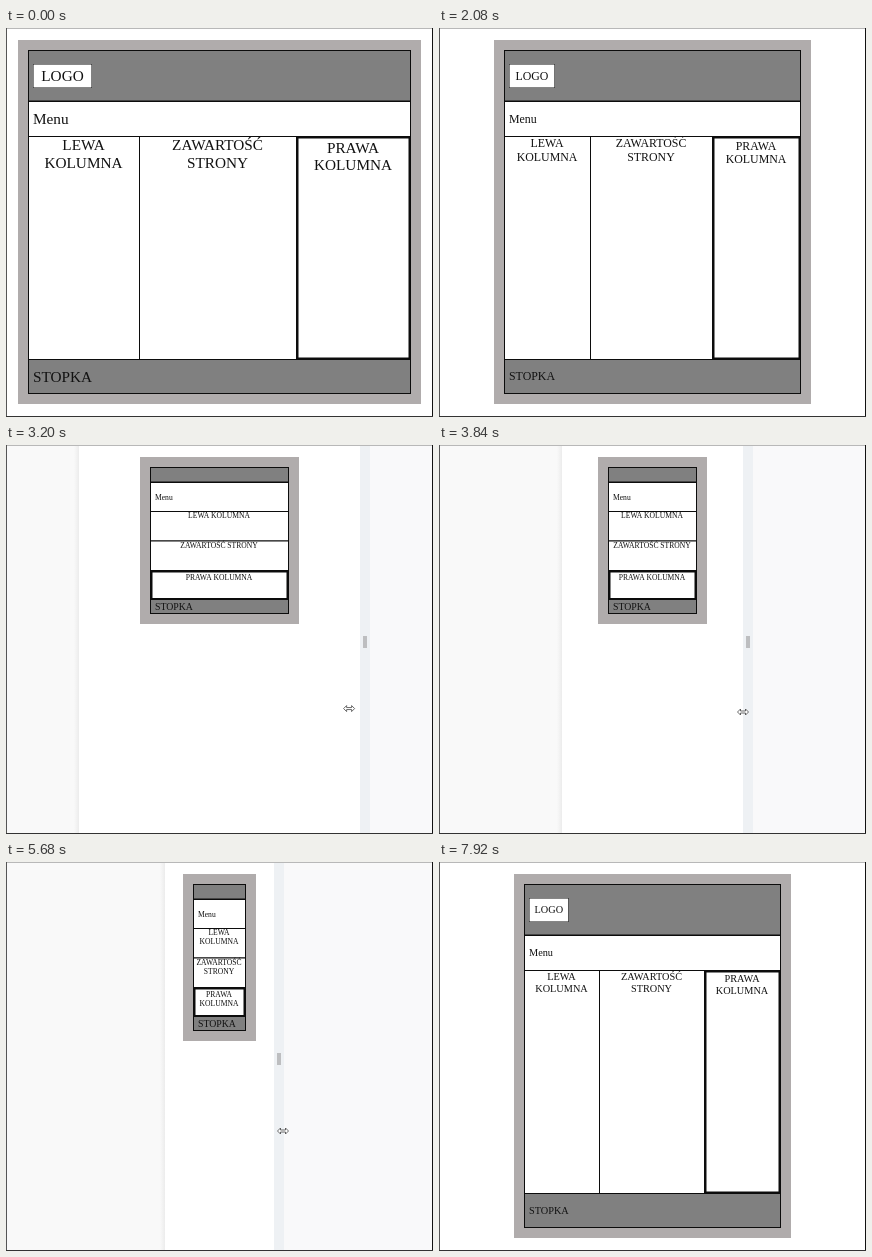
These frames come from a looping animation (427 by 389 pixels, 8000 ms). An HTML page with a canvas:

```html
<!DOCTYPE html>
<html lang="pl">
<head>
<meta charset="utf-8">
<title>Responsive layout</title>
<style>
  html, body { margin: 0; width: 100%; height: 100%; overflow: hidden; background: #fff; }
  canvas { display: block; }
</style>
</head>
<body>
<canvas id="stage" width="427" height="389"></canvas>
<script>
const W = 427, H = 389, LOOP = 8000, STEP = 80;
const ctx = document.getElementById('stage').getContext('2d');

// [time, value] pairs, joined linearly
const VIEWPORT = [[1420, 764], [1520, 750], [2240, 550], [2720, 420], [3120, 293], [3840, 181],
  [4000, 167], [4880, 127], [5680, 109], [6000, 109], [6800, 221], [7120, 300], [7920, 514]];
const CURSOR_X = [[2560, 440], [2720, 405], [3120, 348], [3840, 304], [4000, 297], [4880, 281],
  [5680, 277], [6000, 277], [6800, 346], [7120, 389], [7440, 450]];
const CURSOR_Y = [[2720, 261], [3840, 267], [5680, 269], [6000, 269], [7120, 263]];

const THREE_COLUMNS = 470, TWO_COLUMNS = 290;

function at(keys, t) {
  if (t <= keys[0][0]) return keys[0][1];
  for (let i = 1; i < keys.length; i++) {
    const [t0, a] = keys[i - 1], [t1, b] = keys[i];
    if (t <= t1) return a + (b - a) * (t - t0) / (t1 - t0);
  }
  return keys[keys.length - 1][1];
}

function fill(x, y, w, h, color) {
  ctx.fillStyle = color;
  ctx.fillRect(x, y, w, h);
}

function box(x, y, w, h, color, line = 1) {
  fill(x, y, w, h, '#0c0c0c');
  fill(x + line, y + line, w - 2 * line, h - 2 * line, color);
}

function text(str, x, middle, size, align = 'left') {
  ctx.font = `${size}px "Liberation Serif", "Times New Roman", serif`;
  ctx.textAlign = align;
  ctx.fillStyle = '#111';
  ctx.fillText(str, x, middle + size * 0.33);
}

function column(label, x, y, w, h, size, line, wrap) {
  box(x, y, w + 1, h + 1, '#fff', line);
  ctx.font = `${size}px "Liberation Serif", "Times New Roman", serif`;
  const lines = wrap || ctx.measureText(label).width > w - 2 * line + 2 ? label.split(' ') : [label];
  const lead = size * 1.15;
  lines.forEach((s, i) => text(s, x + w / 2, y + (line > 1 ? line : 0) + lead * (i + 0.5) + 0.5, size, 'center'));
}

function page(view) {
  const outer = 18 + 0.504 * view;
  const left = Math.round(213.5 - outer / 2), right = Math.round(213.5 + outer / 2);
  const x = left + 10, w = right - left - 20;
  const size = Math.max(7.6, view * 0.02), footSize = Math.max(9.8, view * 0.02);
  const three = view >= THREE_COLUMNS, one = view < TWO_COLUMNS;
  const [menu, cols, foot, bottom] = one ? [37, 66, 154, 168]
    : [73, 108, three ? 331 : 348, 365];

  fill(left, 12, right - left, bottom + 11 - 12, '#b0acac');
  box(x, 22, w, menu - 21, '#808080');
  if (!one) {
    const logo = size * 3.86;
    box(x + 5, 36, logo, 24, '#fff', 0.5);
    text('LOGO', x + 5 + logo / 2, 48, size, 'center');
  }
  box(x, menu, w, cols - menu + 1, '#fff');
  fill(x, menu - 0.5, w, 1.5, '#0c0c0c');
  text('Menu', x + 5, (menu + cols) / 2 + 0.5, size);

  const names = ['LEWA KOLUMNA', 'ZAWARTOŚĆ STRONY', 'PRAWA KOLUMNA'];
  if (three) {
    const a = Math.round(w * 0.29), b = Math.round(w * 0.7), h = foot - cols;
    column(names[0], x, cols, a, h, size, 1, true);
    column(names[1], x + a, cols, b - a, h, size, 1, true);
    column(names[2], x + b, cols, w - b - 1, h, size, 2.5, true);
  } else if (!one) {
    const a = Math.round(w * 0.453);
    column(names[0], x, cols, a, 171, size, 1);
    column(names[1], x + a, cols, w - a - 1, 171, size, 1);
    column(names[2], x, 279, w - 1, 69, size, 2.5);
  } else {
    names.forEach((s, i) => column(s, x, cols + i * 29.5, w - 1, 29.5, size, i === 2 ? 2.5 : 1));
  }
  box(x, foot, w, bottom - foot + 1, '#808080');
  text('STOPKA', x + 5, (foot + bottom) / 2 + 0.5, footSize);
}

function surroundings(view) {
  const left = Math.round(213.5 - view / 2), right = Math.round(213.5 + view / 2);
  if (left > 0) {
    fill(0, 0, left, H, '#f9f9f9');
    const shade = ctx.createLinearGradient(left - 5, 0, left, 0);
    shade.addColorStop(0, '#f9f9f9');
    shade.addColorStop(1, '#ececec');
    fill(Math.max(0, left - 5), 0, Math.min(5, left), H, shade);
  }
  fill(right, 0, W, H, '#f9f9fa');
  fill(right, 0, 10, H, '#eef1f4');
  for (const dx of [3.5, 5.5]) fill(right + dx, 191, 1, 12, '#8c8c8c');
}

function cursor(x, y) {
  ctx.beginPath();
  [[-5.5, 0], [-2.5, -3], [-2.5, -1], [2.5, -1], [2.5, -3], [5.5, 0],
    [2.5, 3], [2.5, 1], [-2.5, 1], [-2.5, 3]].forEach(([dx, dy]) => ctx.lineTo(x + dx, y + dy));
  ctx.closePath();
  ctx.fillStyle = '#fff';
  ctx.fill();
  ctx.strokeStyle = '#444';
  ctx.lineWidth = 0.8;
  ctx.stroke();
}

function draw(t) {
  const view = at(VIEWPORT, t);
  fill(0, 0, W, H, '#fff');
  surroundings(view);
  page(view);
  if (t > 2560 && t < 7440) cursor(at(CURSOR_X, t), at(CURSOR_Y, t));
  fill(0, 0, W, 1, '#b8b8b8');
  fill(0, 0, 1, H, '#555');
  fill(W - 1, 0, 1, H, '#111');
  fill(0, H - 1, W, 1, '#333');
}

function tick() {
  draw(Math.floor(performance.now() % LOOP / STEP) * STEP);
  requestAnimationFrame(tick);
}
tick();
</script>
</body>
</html>
```
